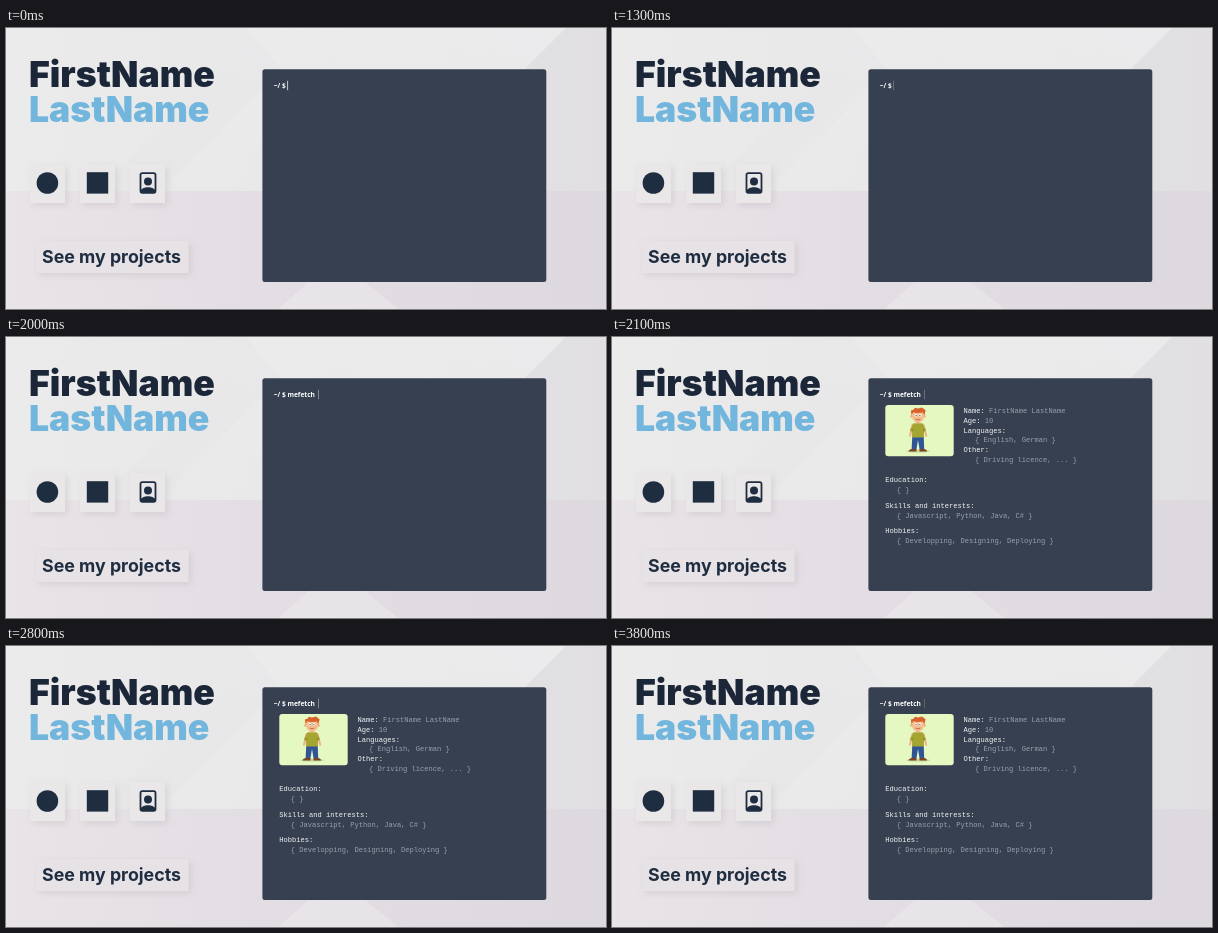
An HTML page that plays this animation: 600x281 px, repeating every 4 s.

```html
<!DOCTYPE html>
<html lang="en">
<head>
<meta charset="utf-8">
<title>Portfolio terminal</title>
<style>
  html, body { margin: 0; width: 100%; height: 100%; overflow: hidden; background: #e8e7e9; }
  svg { display: block; width: 600px; height: 281px; }
  text { white-space: pre; }
  .sans { font-family: Inter, sans-serif; }
  .name { font-size: 35.6px; font-weight: 900; }
  .card { fill: #e9e7e8; filter: url(#soft); }
  #cmd { font: 600 6.6px "Noto Sans", sans-serif; fill: #fff; }
  #output text { font: 7.08px "Liberation Mono", monospace; fill: #98a0ab; }
  #output .label { fill: #f3f4f6; }
</style>
</head>
<body>
<svg viewBox="0 0 600 281">
  <defs>
    <filter id="soft" x="-30%" y="-30%" width="180%" height="180%">
      <feDropShadow dx="2.5" dy="2.5" stdDeviation="3.5" flood-color="#8d8790" flood-opacity=".2"/>
    </filter>
    <linearGradient id="sky" x2="1" y2="0">
      <stop stop-color="#ebebeb"/><stop offset="1" stop-color="#e5e4e6"/>
    </linearGradient>
    <linearGradient id="floor" x2="1" y2="0">
      <stop stop-color="#e9e4e7"/><stop offset=".4" stop-color="#e3dee4"/><stop offset="1" stop-color="#ddd9de"/>
    </linearGradient>
    <linearGradient id="beam" x1="0" y1="1" x2="1" y2="0">
      <stop stop-color="#fff" stop-opacity="0"/><stop offset="1" stop-color="#fff" stop-opacity=".22"/>
    </linearGradient>
  </defs>

  <g id="backdrop">
    <rect width="600" height="281" fill="url(#sky)"/>
    <path d="M0 163H600V281H0Z" fill="url(#floor)"/>
    <path d="M240 0H560L397 163H92L248 10Z" fill="url(#beam)"/>
    <path d="M560 0H600V163H397Z" fill="#dedde0" opacity=".55"/>
    <path d="M248 10L275 41L153 163H92Z" fill="#dfdee1" opacity=".25"/>
    <path d="M330 230L392 281H272Z" fill="#f0edef" opacity=".4"/>
  </g>

  <g class="sans">
    <text class="name" x="23" y="59" fill="#1b2638">FirstName</text>
    <text class="name" x="23" y="93.6" fill="#72b6de">LastName</text>
    <rect class="card" x="30" y="213" width="152.5" height="32" style="fill: #e7e2e6"/>
    <text x="36" y="235" font-size="17.8" font-weight="700" fill="#1f2d40">See my projects</text>
  </g>

  <g fill="#1f2d40">
    <rect class="card" x="24" y="136" width="35" height="39"/>
    <rect class="card" x="74" y="136" width="35" height="39"/>
    <rect class="card" x="124" y="136" width="35" height="39"/>
    <circle cx="41.4" cy="155" r="10.8"/>
    <rect x="80.8" y="144.2" width="21.4" height="21.4"/>
    <rect x="133.6" y="144.2" width="16.8" height="21.6" rx="2.8"/>
    <rect x="135.4" y="146" width="13.2" height="15.8" rx=".8" fill="#e9e7e8"/>
    <circle cx="142" cy="153.4" r="4"/>
    <path d="M135.4 162.5C135.8 160 138.5 159.2 142 159.2S148.2 160 148.6 162.5Z"/>
  </g>

  <rect x="256.4" y="41.2" width="283.9" height="212.7" rx="2.5" fill="#364050"/>
  <text id="cmd" x="267.8" y="60.2"></text>
  <rect id="cursor" y="52.8" width=".75" height="9.4" fill="#fff"/>

  <g id="output">
    <rect x="273.3" y="68" width="68.4" height="51.2" rx="3" fill="#e5f8c2"/>
    <g id="boy">
      <ellipse cx="306" cy="114.2" rx="12" ry="1.4" fill="#c4d69e"/>
      <path d="M300.3 99H311.7L312.2 112.5H307.6L306 103L304.4 112.5H299.6Z" fill="#2f5597"/>
      <path d="M304.5 112H299.5Q296.6 112.6 296.8 114.6H304.5ZM307.5 112H312.5Q315.2 112.6 315 114.6H307.5Z" fill="#7b4425"/>
      <path d="M300.5 88L298 98.8M311.5 88L314.2 98.8" stroke="#efb184" stroke-width="2" stroke-linecap="round"/>
      <path d="M301.5 86.2H310.5L314.2 93.5L311.9 94.5V100.5H300.1V94.5L297.8 93.5Z" fill="#a5a632"/>
      <path d="M300.2 94.6V92M311.8 94.6V92" stroke="#747722" stroke-width=".6"/>
      <rect x="304.5" y="84" width="3" height="3" fill="#e4a273"/>
      <circle cx="299.7" cy="79.3" r="1.5" fill="#efb184"/>
      <circle cx="312.3" cy="79.3" r="1.5" fill="#efb184"/>
      <ellipse cx="306" cy="79" rx="6" ry="6.6" fill="#f5bd8e"/>
      <path d="M299.6 78.5L298.8 73.5L301.4 72.8L303 70.8L306 71.6L310 70.6L313.6 73.2L312.4 78.5L310.8 75.4L305 76L301.2 75.2Z" fill="#d9622b"/>
      <g fill="#fff"><circle cx="303.9" cy="78.3" r="1.3"/><circle cx="308.1" cy="78.3" r="1.3"/></g>
      <g fill="#2b2522"><circle cx="304.1" cy="78.5" r=".6"/><circle cx="307.9" cy="78.5" r=".6"/></g>
      <path d="M303.6 82Q306 84 308.4 82" fill="none" stroke="#9b4a32" stroke-width=".7"/>
    </g>
  </g>
</svg>
<script>
  const LOOP = 4000, STEP = 100, LAST = 3800;
  const TYPE_START = 1290, CHAR_MS = 78, OUTPUT_AT = 2100;
  const PROMPT = '~/ $ ', COMMAND = 'mefetch  ';
  const BLINK = 800;
  // Cursor opacity at each eighth of a blink
  const GLOW = [.95, .95, .83, .68, .5, .35, .25, .18];

  const LINES = [
    [351.5, 75.6, 'Name:', ' FirstName LastName'],
    [351.5, 85.6, 'Age:', ' 10'],
    [351.5, 95.6, 'Languages:', ''],
    [363, 105.4, '', '{ English, German }'],
    [351.5, 115.4, 'Other:', ''],
    [363, 125.4, '', '{ Driving licence, ... }'],
    [273.3, 145.2, 'Education:', ''],
    [284.7, 155.2, '', '{ }'],
    [273.3, 170.6, 'Skills and interests:', ''],
    [284.7, 180.6, '', '{ Javascript, Python, Java, C# }'],
    [273.3, 196.2, 'Hobbies:', ''],
    [284.7, 206.2, '', '{ Developping, Designing, Deploying }']
  ];

  const $ = id => document.getElementById(id);
  const cmd = $('cmd'), cursor = $('cursor'), output = $('output');

  function add(parent, tag, attrs, content = '') {
    const el = document.createElementNS(parent.namespaceURI, tag);
    for (const key in attrs) el.setAttribute(key, attrs[key]);
    el.textContent = content;
    return parent.appendChild(el);
  }

  for (const [x, y, label, value] of LINES) {
    const line = add(output, 'text', { x, y });
    if (label) add(line, 'tspan', { class: 'label' }, label);
    if (value) add(line, 'tspan', {}, value);
  }

  function glow(t) {
    const p = (t % BLINK) / BLINK * GLOW.length;
    const i = Math.floor(p), next = GLOW[(i + 1) % GLOW.length];
    return GLOW[i] + (next - GLOW[i]) * (p - i);
  }

  function draw(now) {
    const t = Math.min(Math.floor((now % LOOP) / STEP) * STEP, LAST);
    const typed = Math.max(0, Math.floor((t - TYPE_START) / CHAR_MS));
    cmd.textContent = PROMPT + COMMAND.slice(0, typed);
    cursor.setAttribute('x', 267.6 + cmd.getComputedTextLength());
    cursor.setAttribute('opacity', glow(t));
    output.setAttribute('visibility', t >= OUTPUT_AT ? 'visible' : 'hidden');
  }

  const start = performance.now();
  function tick() {
    draw(performance.now() - start);
    requestAnimationFrame(tick);
  }
  tick();
</script>
</body>
</html>
```
